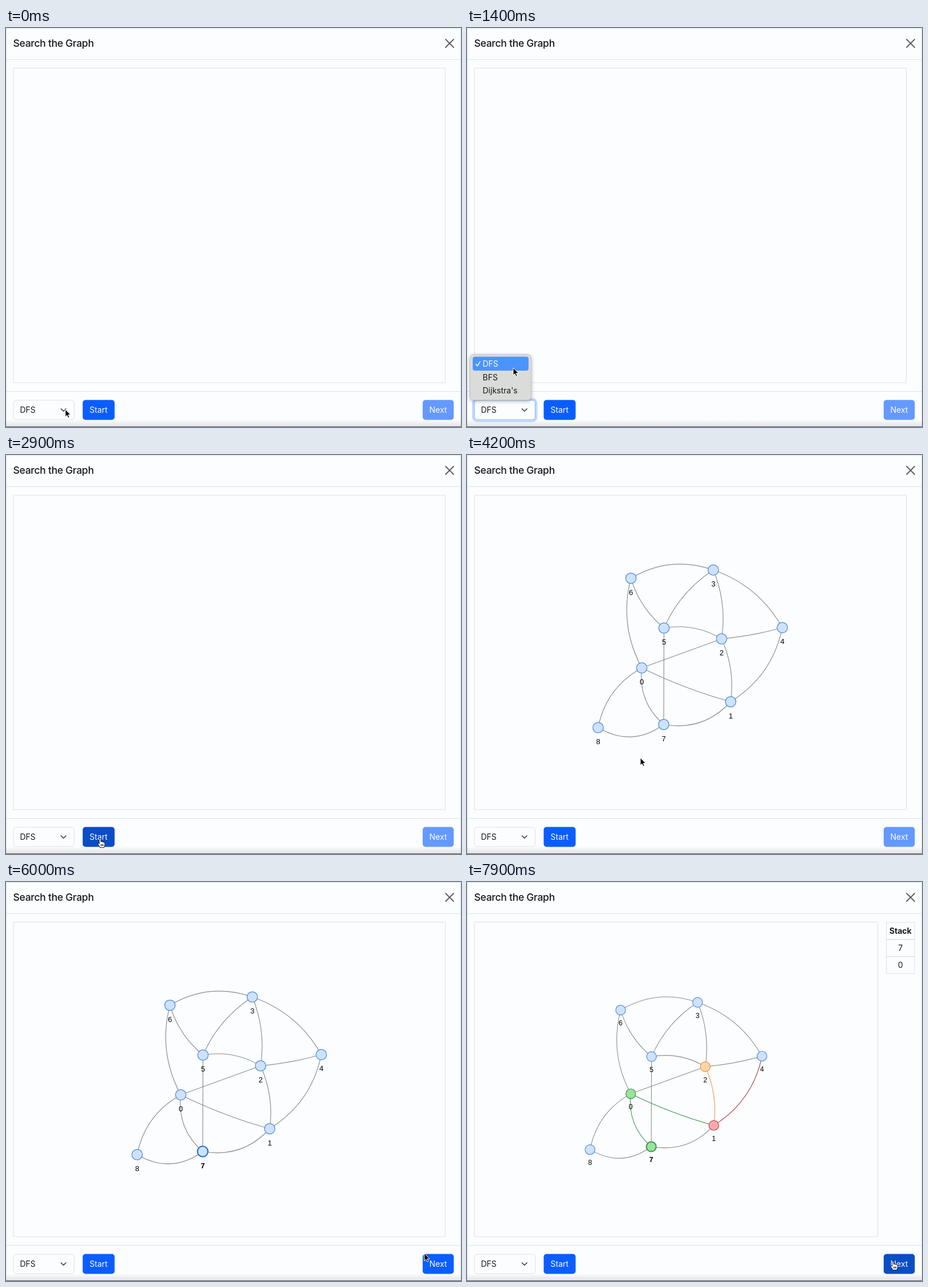
Write an HTML page that moves like this. It is 798x701 px and loops after 8 s.

```html
<!DOCTYPE html>
<html lang="en">
<head>
<meta charset="utf-8">
<title>Search the Graph</title>
<style>
  html, body { margin: 0; width: 100%; height: 100%; overflow: hidden; background: #fcfdff; }
  svg { display: block; width: 798px; height: 701px; }
  text { font-family: Inter, sans-serif; font-size: 14px; fill: #16191d; }
  .title { font-size: 17.6px; font-weight: 500; letter-spacing: -.33px; }
  .mid { text-anchor: middle; }
  .white { fill: #fff; }
  .bold { font-weight: 700; }
  .line { fill: none; stroke: #dce1e6; }
  .edge { fill: none; stroke-width: 1.15; }
  .label { font: 13px "Liberation Sans", Arial, sans-serif; fill: #000; text-anchor: middle; }
  .label.bold { font-weight: 700; }
</style>
</head>
<body>
<svg viewBox="0 0 798 701">
  <defs>
    <linearGradient id="shade" x1="0" y1="0" x2="0" y2="1">
      <stop offset="0" stop-color="#888" stop-opacity="0"/>
      <stop offset="1" stop-color="#888" stop-opacity=".22"/>
    </linearGradient>
    <filter id="soft" x="-20%" y="-20%" width="140%" height="150%">
      <feDropShadow dx="0" dy="2" stdDeviation="3" flood-opacity=".28"/>
    </filter>
  </defs>
  <rect width="798" height="701" fill="#fcfdff"/>
  <path class="line" d="M.5 701V.5H797.5V701M0 55.5H798M0 638.5H798"/>
  <text class="title" x="12.5" y="33">Search the Graph</text>
  <path d="M771 20l14 14m0-14l-14 14" stroke="#5a5c60" stroke-width="1.8" stroke-linecap="round"/>
  <rect id="frame" class="line" x="13" y="70.5" width="757.5" height="552.5"/>
  <g id="graph"><g id="edges"></g><g id="nodes"></g></g>
  <g id="stack"></g>
  <rect x="0" y="688" width="798" height="12" fill="url(#shade)"/>
  <rect x="0" y="700" width="798" height="1" fill="#55575a"/>

  <rect id="ring" x="11" y="652" width="110.5" height="38.5" rx="7" fill="none" stroke="#bfd9ff" stroke-width="4"/>
  <rect id="select" x="13" y="654" width="106.5" height="34" rx="5" fill="#fcfdff"/>
  <text x="24.5" y="676">DFS</text>
  <path d="M96.5 669l4.3 4.2 4.3-4.2" fill="none" stroke="#343a40" stroke-width="1.6" stroke-linecap="round" stroke-linejoin="round"/>
  <rect id="start" x="134.5" y="653.5" width="56" height="35" rx="5"/>
  <text class="mid white" x="162.3" y="676">Start</text>
  <rect id="next" x="730.8" y="653.5" width="54.5" height="35" rx="5"/>
  <text class="mid white" x="758" y="676">Next</text>

  <g id="menu">
    <rect x="5.5" y="573.5" width="107" height="80" rx="6" fill="#dadcda" stroke="#c3c5c4" filter="url(#soft)"/>
    <rect x="10" y="577.5" width="98" height="24.5" rx="4" fill="#4b94fd"/>
    <path d="M15.5 590.5l2.8 3.3 4.7-7.6" fill="none" stroke="#fff" stroke-width="1.5" stroke-linecap="round" stroke-linejoin="round"/>
    <text class="white" x="27.5" y="595">DFS</text>
    <text x="27.5" y="618.7">BFS</text>
    <text x="27.5" y="642.3">Dijkstra's</text>
  </g>

  <g id="cursor">
    <path id="arrow" d="M0 0V13.2L3 10.4 5 15 7.2 14 5.2 9.6H9.3Z" fill="#000" stroke="#fff" stroke-width="1"/>
    <path id="hand" d="M-1.4 .8C-1.4-.9 1.2-.9 1.3 .8V5C2 4.1 3.6 4.3 3.8 5.5 4.6 4.8 6 5.2 6.2 6.3 7.2 5.8 8.3 6.5 8.3 7.8V10.5C8.3 12.5 7.2 13.2 7 15.2H-.2C-.4 13.2-2.6 11.5-3.8 9.4-4.7 7.9-3.1 6.9-2.1 7.9L-1.4 8.7ZM1.6 9.2V12.5M3.5 9.2V12.5M5.4 9.2V12.5" fill="#fff" stroke="#111" stroke-width="1" stroke-linejoin="round"/>
  </g>
</svg>
<script>
const LOOP = 8000;
const $ = id => document.getElementById(id);

function add(parent, tag, attrs, text) {
  const el = document.createElementNS("http://www.w3.org/2000/svg", tag);
  for (const k in attrs) el.setAttribute(k, attrs[k]);
  if (text !== undefined) el.textContent = text;
  return parent.appendChild(el);
}
const show = (el, on) => el.setAttribute("visibility", on ? "visible" : "hidden");

const points = [[306.5, 374], [462.5, 433.5], [446.5, 323], [432, 202], [553, 303.3],
  [345.5, 304], [287.5, 216.5], [345, 473.5], [230, 479]];
// from, to, bulge to the left of travel
const links = [[6, 3, 17], [3, 4, 15], [4, 1, 17], [0, 6, 15.5], [8, 0, 15], [7, 8, 19],
  [1, 7, 17], [7, 0, 14], [5, 6, 8], [5, 3, 10], [5, 2, 9.5], [3, 2, 8.5], [2, 1, 8],
  [1, 0, 4], [4, 2, 2.5], [0, 2, 0], [5, 7, 0]];
const palette = {
  blue: ["#cfe1fd", "#4a8fe0"], orange: ["#ffd6a5", "#e98c3c"],
  green: ["#9be29b", "#3b9150"], red: ["#f7abab", "#bd4248"]
};
const edgeColor = { none: "#8c8c8c", orange: "#ef9a45", green: "#3d9158", red: "#a23b3e" };

const edges = {};
for (const [a, b, bulge] of links) {
  const [x1, y1] = points[a], [x2, y2] = points[b];
  const k = 2 * bulge / Math.hypot(x2 - x1, y2 - y1);
  const cx = (x1 + x2) / 2 + (y2 - y1) * k, cy = (y1 + y2) / 2 - (x2 - x1) * k;
  edges[`${a}-${b}`] = add($("edges"), "path",
    { class: "edge", d: `M${x1} ${y1}Q${cx} ${cy} ${x2} ${y2}` });
}
const nodes = points.map(([cx, cy], i) => ({
  dot: add($("nodes"), "circle", { cx, cy, r: 9.2 }),
  label: add($("nodes"), "text", { x: cx, y: cy + 29, class: "label" }, i)
}));

const cells = ["Stack", "7", "0"].map((word, i) => {
  const cell = add($("stack"), "g", {});
  add(cell, "rect", { class: "line", x: 735.5, y: 71 + 30 * i, width: 49.5, height: 30 });
  add(cell, "text", { class: i ? "mid" : "mid bold", x: 760.2, y: 91 + 30.2 * i }, word);
  return cell;
});

const steps = [
  { at: 0, rows: 0, nodes: {}, edges: {} },
  { at: 6500, rows: 1, nodes: { 7: "orange" }, edges: {} },
  { at: 7050, rows: 1, nodes: { 7: "red", 0: "orange" }, edges: { "7-0": "orange" } },
  { at: 7400, rows: 2, nodes: { 7: "green", 0: "red", 1: "orange" },
    edges: { "7-0": "green", "1-0": "orange" } },
  { at: 7800, rows: 3, nodes: { 7: "green", 0: "green", 1: "red", 2: "orange" },
    edges: { "7-0": "green", "1-0": "green", "2-1": "orange", "4-1": "red" } }
];

// time, x, y of the pointer tip
const path = [[0, 104, 670], [650, 104, 670], [1250, 81, 597], [2050, 81, 597], [2750, 165, 674.5],
  [3650, 165, 674.5], [4200, 304, 532], [4550, 344, 474], [5250, 344, 474],
  [6000, 733.5, 652.5], [6200, 747, 666.5], [LOOP, 747, 666.5]];
function pointer(t) {
  const i = path.findIndex((p, n) => n && t < p[0]);
  const [t0, x0, y0] = path[i - 1], [t1, x1, y1] = path[i];
  const u = (t - t0) / (t1 - t0), s = u * u * (3 - 2 * u);
  return [x0 + (x1 - x0) * s, y0 + (y1 - y0) * s];
}

function draw(t) {
  const step = steps.filter(s => s.at <= t).pop();
  const picked = t >= 4600;
  const [x, y] = pointer(t);
  const inRow = y > 653.5 && y < 688.5;
  const onStart = inRow && x > 134.5 && x < 190.5;
  const onNext = inRow && x > 730.8 && x < 785.3;
  const focus = t >= 500 && t < 2800;

  show($("menu"), t >= 500 && t < 2050);
  show($("ring"), focus);
  $("select").setAttribute("stroke", focus ? "#86b7fe" : "#dce1e6");
  $("start").setAttribute("fill", onStart ? "#0a4dc6" : "#0a5dff");
  $("next").setAttribute("fill", !picked ? "#6499ff" : onNext ? "#0a4dc6" : "#0a5dff");

  show($("graph"), t >= 3000);
  $("graph").setAttribute("transform", step.rows ? "matrix(.9337 0 0 .9337 1.05 22.9)" : "");
  $("frame").setAttribute("width", step.rows ? 707.5 : 757.5);
  cells.forEach((c, i) => show(c, i < step.rows));

  for (const k in edges) edges[k].setAttribute("stroke", edgeColor[step.edges[k] || "none"]);
  nodes.forEach(({ dot, label }, i) => {
    const bold = picked && i === 7;
    const name = step.nodes[i] || "blue";
    const [fill, stroke] = palette[name];
    dot.setAttribute("fill", fill);
    dot.setAttribute("stroke", bold && name === "blue" ? "#1b6fe0" : stroke);
    dot.setAttribute("stroke-width", bold ? 2.1 : 1.3);
    label.setAttribute("class", bold ? "label bold" : "label");
  });

  $("cursor").setAttribute("transform", `translate(${x} ${y})`);
  show($("hand"), onStart || onNext);
  show($("arrow"), !onStart && !onNext);
}

const begin = performance.now();
function tick() {
  draw((performance.now() - begin) % LOOP);
  requestAnimationFrame(tick);
}
tick();
</script>
</body>
</html>
```
